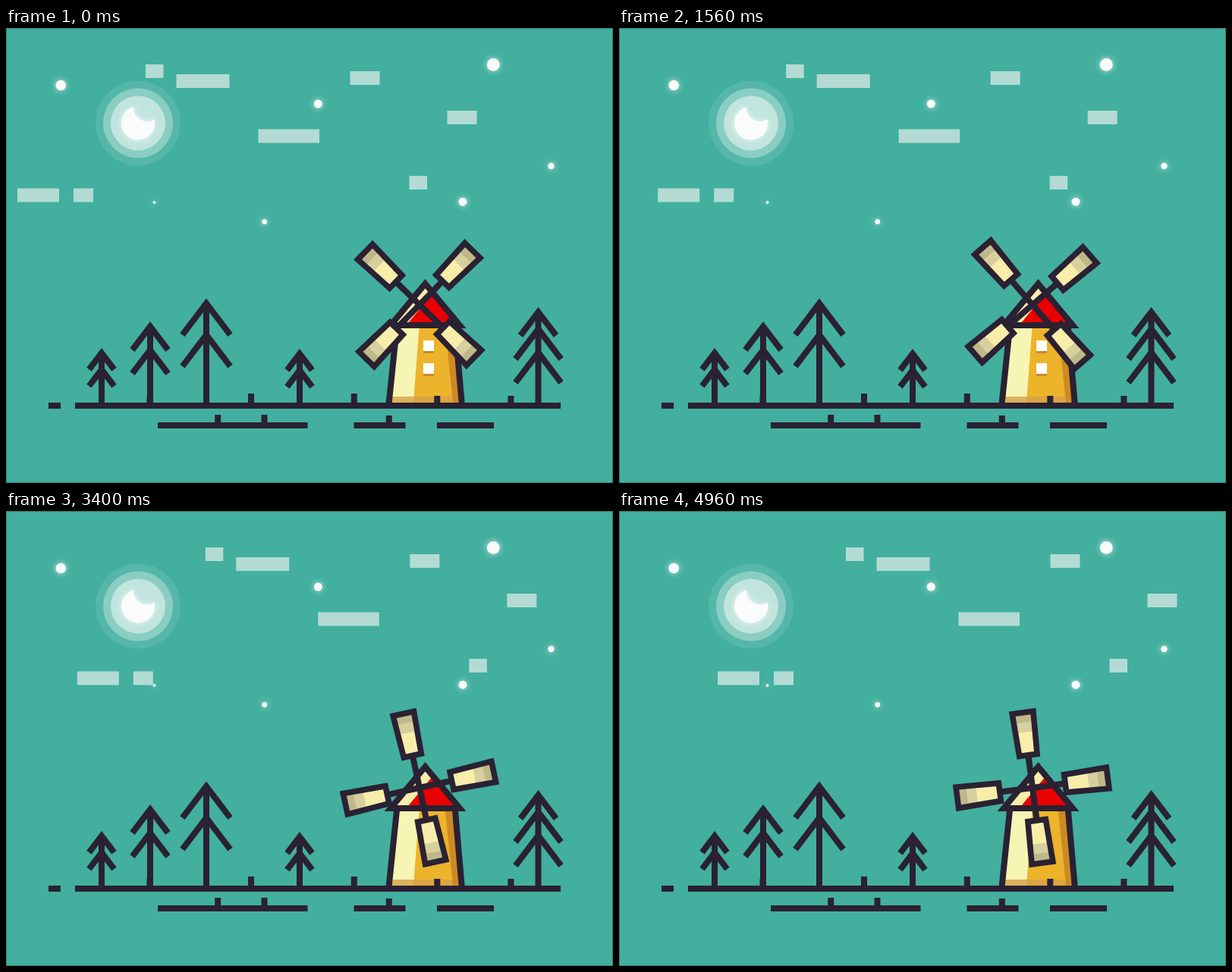
An HTML page that plays this animation: 800x600 px, repeating every 5000 ms.

```html
<!DOCTYPE html>
<html lang="en">
<head>
<meta charset="utf-8">
<title>Windmill at night</title>
<style>
  html, body { margin: 0; width: 100%; height: 100%; overflow: hidden; background: #42af9f; }
  svg { display: block; width: 800px; height: 600px; }
  .line { fill: none; stroke: #2a2132; stroke-width: 8; }
  .glow { fill: #fafcfb; filter: drop-shadow(0 0 4px #fffb); }
</style>
</head>
<body>
<svg viewBox="0 0 800 600">
  <defs>
    <g id="blade">
      <path class="line" d="M0 0V-44"/>
      <path fill="#f8eeaa" d="M-14-100H14L11.8-43.5H-11.8Z"/>
      <path fill="#d7cf9d" d="M-14-100H14L13-74H-13Z"/>
      <path fill="#bfb888" d="M-14-100H14L13.5-87H-13.5Z"/>
      <path class="line" style="stroke-width:7.6" d="M-14-100H14L11.8-43.5H-11.8Z"/>
    </g>
  </defs>

  <path id="clouds" stroke="#b3dbd4" stroke-width="18"
    d="M184 57h23.5m17 13h70M453.5 66h39M332.5 142.5H413M581.5 118h39M531.5 204H555M15 220.5h55m19 0h26"/>

  <g id="moon">
    <circle cx="174" cy="125.5" r="56" fill="#55b7a9"/>
    <circle cx="174" cy="125.5" r="46" fill="#8acdc2"/>
    <circle cx="174" cy="125.5" r="36" fill="#c1e4de"/>
    <path class="glow" d="M168 104.3A22 22 0 1 0 195.5 120.5A18 18 0 0 1 168 104.3Z"/>
  </g>

  <g class="glow">
    <circle cx="72.3" cy="75.5" r="6.8"/>
    <circle cx="642.3" cy="48.4" r="8.4"/>
    <circle cx="411.3" cy="100" r="5.5"/>
    <circle cx="602" cy="229.2" r="5.5"/>
    <circle cx="718.5" cy="182" r="4.2"/>
    <circle cx="340.7" cy="255.4" r="3.4"/>
    <circle cx="195.5" cy="230" r="1.9"/>
  </g>

  <g id="mill">
    <path fill="#f6f5b3" d="M515.5 392H591.5L600.5 494H504.5Z"/>
    <path fill="#edb32b" d="M544.8 392H591.5L600.5 494H537Z"/>
    <path fill="#d8a248" opacity=".8" d="M505 486H600V494H505Z"/>
    <path fill="#cd8a24" d="M578.6 392H591.5L600.5 494H589ZM550 426h14v3h-14zM550 456h14v3h-14z"/>
    <path fill="#fff" d="M550 412h14v14h-14zM550 442h14v14h-14z"/>
    <path class="line" d="M515.3 392L504.5 496M591.7 392L600.8 496"/>
    <path fill="#f8eeaa" d="M552.5 337.3L598 392H507Z"/>
    <path fill="#ea0000" d="M563 349L598 392H527.5Z"/>
    <path class="line" d="M552.5 337.3L598 392H507Z"/>
  </g>

  <path id="trees" class="line"/>
  <path class="line" d="M56 498h16m19 0h640M200 524h197.5m61 0h68m41.5 0h75"/>
  <path class="line" d="M189.5 485v9M323 482v12M458.8 482v12M568.3 485v9M665.4 485v9M279.2 510v10M340.5 510v10M504.8 511v9"/>

  <g id="sails"></g>
  <rect x=".5" y=".5" width="799" height="599" fill="none" stroke="#2f7c74"/>
</svg>
<script>
  const $ = id => document.getElementById(id);

  // Trunk with stacked chevrons; every tier starts one tip height below the last.
  function tree(x, top, width, tiers = 2, tip = width) {
    const slope = 1.32, gap = tip * slope;
    let path = `M${x} ${top}V496`;
    for (let i = 0; i < tiers; i++) {
      const half = i ? width : tip;
      const foot = top + gap * (i + 1);
      path += `M${x - half} ${foot}L${x} ${foot - half * slope}L${x + half} ${foot}`;
    }
    return path;
  }

  $('trees').setAttribute('d',
    tree(126, 428.5, 16.5) + tree(190, 393.5, 23.5) + tree(264, 363, 31.5) +
    tree(387, 429.5, 16.5) + tree(701.5, 374.5, 30, 3, 23.5));

  for (let angle = 0; angle < 360; angle += 90) {
    $('sails').innerHTML += `<use href="#blade" transform="rotate(${angle})"/>`;
  }

  const LOOP = 5000, STEP = 40;
  const start = performance.now();

  function draw(now) {
    const step = Math.floor(Math.max(0, now - start) % LOOP / STEP);
    $('clouds').setAttribute('transform', `translate(${step * 0.9274})`);
    $('sails').setAttribute('transform', `translate(545 365) rotate(${44.25 + step * 16.2766})`);
    requestAnimationFrame(draw);
  }
  draw(start);
</script>
</body>
</html>
```
